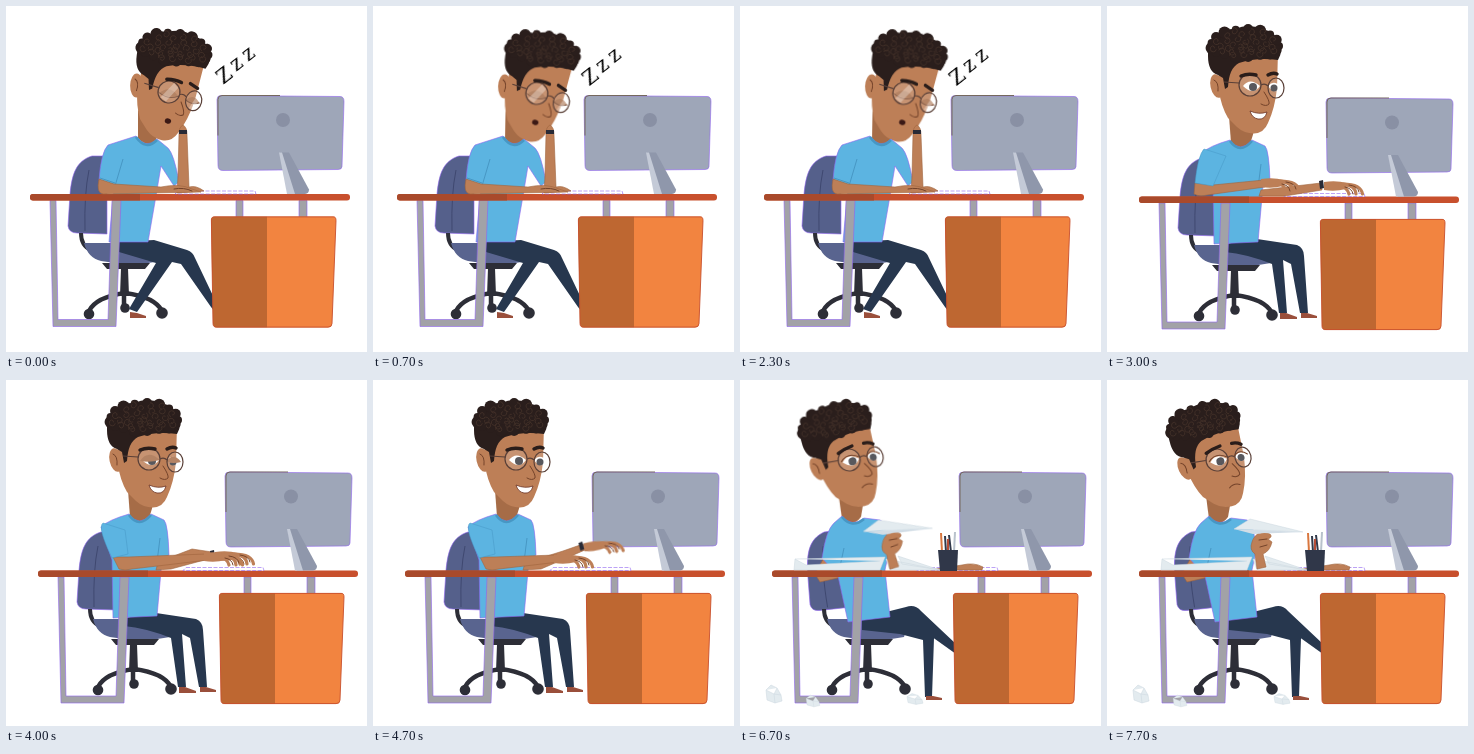
Recreate the animation shown at these times as an HTML page. Size 361x346 px, loop 8 s.

```html
<!DOCTYPE html>
<html lang="en">
<head>
<meta charset="utf-8">
<title>A day at the desk</title>
<style>
  html, body { margin: 0; width: 100%; height: 100%; overflow: hidden; background: #fff; }
  svg { display: block; width: 100%; height: 100%; }

  .skin { fill: #bd7f57; }
  .shade { fill: #a66c47; }
  .shirt { fill: #5cb4e1; }
  .fold { fill: none; stroke: #4797c4; }
  .collar { fill: none; stroke: #4797c4; stroke-width: 2.6; }
  .navy { fill: #27374e; }
  .dark { fill: #2d2e37; }
  .gray { fill: #a2a2a7; }
  .shoe { fill: #9a4f3b; }
  .white { fill: #fff; }
  .paper { fill: #e3ebef; stroke: #cbd6de; stroke-width: .5; }
  .edge { stroke: #8f63f0; stroke-width: .6; }
  .line { fill: none; stroke: #74432a; stroke-width: 1; stroke-linecap: round; }
  .brow { fill: none; stroke: #2a1d1a; stroke-width: 3.4; stroke-linecap: round; }
  .arm { stroke: #a0653f; stroke-width: .6; stroke-linejoin: round; }
  .finger { fill: none; stroke: #bd7f57; stroke-width: 3.2; stroke-linecap: round; }

  /* every part shares one clock */
  .a { animation: 8s linear infinite; }
  .eased { animation-timing-function: ease-in-out; }

  .sleep { animation-name: sleep; animation-timing-function: step-end; }
  .type { animation-name: type; animation-timing-function: step-end; visibility: hidden; }
  .throw { animation-name: throw; animation-timing-function: step-end; visibility: hidden; }
  @keyframes sleep { 0% { visibility: visible } 36.25%, 100% { visibility: hidden } }
  @keyframes type { 0% { visibility: hidden } 36.25% { visibility: visible } 77.5%, 100% { visibility: hidden } }
  @keyframes throw { 0% { visibility: hidden } 77.5%, 100% { visibility: visible } }

  .nod { animation-name: nod; transform-origin: 140px 135px; }
  @keyframes nod {
    0%, 18.75%, 36.25%, 100% { transform: none }
    9.4%, 28% { transform: translateY(1px) rotate(1deg) }
  }
  .z { animation-name: drift; }
  @keyframes drift {
    0%, 18.75%, 36.25%, 100% { transform: none }
    9.4%, 28% { transform: translate(-1px, 1.5px) }
  }

  .lids { animation-name: lids; animation-timing-function: step-end; opacity: 0; }
  @keyframes lids {
    0% { opacity: 0 } 48.75% { opacity: 1 } 52.5% { opacity: 0 }
    65% { opacity: 1 } 67.5%, 100% { opacity: 0 }
  }

  .sleeve { animation-name: sleeve; }
  @keyframes sleeve {
    0%, 46.25%, 75%, 100% { d: path("M97 143 Q91 149 88 177 L106 180 L119 150 Z") }
    50%, 68.75% { d: path("M97 143 Q91 147 106 178 L122 174 L119 150 Z") }
  }
  .near { animation-name: near; }
  @keyframes near {
    0%, 37.5%, 46.25%, 77.5%, 100% { d: path("M88 177 L87 188 Q92 191 100 189 L158 181 L157 174 L106 179 Z") }
    42.5%, 75% { d: path("M88 177 L89 189 Q95 191 102 189 L164 178 L162 171 L106 179 Z") }
    50%, 55.6%, 61.9%, 68.75% { d: path("M107 177 L113 189 Q119 191 126 189 L202 180 L200 174 L122 177 Z") }
    52.5%, 58.75%, 65% { d: path("M107 177 L113 189 Q119 191 126 189 L186 182 L184 175 L122 177 Z") }
  }
  .nearhand { animation-name: nearhand; transform: translate(157px, 177px); }
  @keyframes nearhand {
    0%, 37.5%, 46.25%, 77.5%, 100% { transform: translate(157px, 177px) }
    42.5%, 75% { transform: translate(162px, 174px) rotate(3deg) }
    50%, 55.6%, 61.9%, 68.75% { transform: translate(201px, 177px) }
    52.5%, 58.75%, 65% { transform: translate(184px, 179px) }
  }
  .far { animation-name: far; }
  @keyframes far {
    0%, 37.5%, 46.25%, 77.5%, 100% { d: path("M152 190 L154 184 L214 177 L215 184 L178 190 Z") }
    42.5%, 75% { d: path("M152 190 L154 184 L216 174 L218 181 L178 190 Z") }
    50%, 55.6%, 61.9%, 68.75% { d: path("M150 190 L152 182 L186 169 L206 172 L206 178 L165 189 Z") }
    52.5%, 58.75%, 65% { d: path("M150 190 L152 183 L190 171 L210 164 L212 170 L168 189 Z") }
  }
  .farhand { animation-name: farhand; transform: translate(220px, 180px); }
  @keyframes farhand {
    0%, 37.5%, 46.25%, 77.5%, 100% { transform: translate(220px, 180px) }
    42.5%, 75% { transform: translate(223px, 178px) }
    50%, 55.6%, 61.9%, 68.75% { transform: translate(212px, 176px) }
    52.5%, 58.75%, 65% { transform: translate(214px, 167px) rotate(-7deg) }
  }

  .aim { animation-name: aim; transform-origin: 153px 190px; }
  @keyframes aim {
    0%, 77.5% { transform: rotate(-5deg) }
    81% { transform: rotate(4deg) } 84.5% { transform: rotate(-6deg) }
    88% { transform: rotate(4deg) } 91% { transform: rotate(-3deg) }
    93.75%, 100% { transform: none }
  }
  .sigh { animation-name: sigh; transform-origin: 110px 135px; }
  @keyframes sigh {
    0%, 77.5% { transform: rotate(2deg) } 85% { transform: rotate(-1deg) }
    93.75%, 100% { transform: none }
  }
</style>
</head>
<body>
<svg viewBox="0 0 361 346" preserveAspectRatio="none">
  <defs>
    <g id="back">
      <path class="edge" fill="#55608b" d="M95 152 C79 157 75 170 73 190 L71 222 Q72 229 80 229 L110 230 V152 Z"/>
      <path fill="none" stroke="#3f4870" d="M92 166 Q87 190 88 227"/>
    </g>
    <g id="base">
      <path fill="none" stroke="#2d2e37" stroke-width="4" d="M84 229 Q84 242 94 246"/>
      <path fill="#59648f" d="M87 239 H160 Q168 248 164 257 Q136 263 104 257 Q91 254 87 239 Z"/>
      <path class="dark" d="M105 259 H153 L148 265 H110 Z M124 264 H131 L132 292 H123 Z"/>
      <path fill="none" stroke="#2d2e37" stroke-width="4.5" d="M92 307 Q99 293 128 289 Q158 293 165 307 M127 290 V302"/>
      <circle class="dark" cx="92" cy="310" r="5.3"/>
      <circle class="dark" cx="128" cy="304" r="4.8"/>
      <circle class="dark" cx="165" cy="309" r="5.8"/>
    </g>
    <g id="desk">
      <path class="gray edge" d="M238 197 H245 V214 H238 Z M301 197 H309 V214 H301 Z"/>
      <path fill="#be6731" d="M217 213 H269 V324 H219 Q215 324 215 320 L213 217 Q213 213 217 213 Z"/>
      <path fill="#f28440" d="M269 213 H335 Q338 213 338 217 L334 320 Q334 324 330 324 H269 Z"/>
      <path fill="none" stroke="#c8502d" stroke-width=".9" d="M217 213.4 H335 Q338 213 338 217 L334 320 Q334 323.6 330 323.6 H219 Q215 324 215 320 L213.4 217 Q213 213 217 213.4 Z"/>
      <path class="gray edge" d="M52 197 H58 L60 316 H110 L114 197 H123 L118 323 H55 Z"/>
      <rect x="32" y="190.5" width="320" height="6.5" rx="3" fill="#c8502d"/>
      <path fill="#a94a2b" d="M35 190.5 H142 V197 H35 Q32 197 32 193.7 Q32 190.5 35 190.5 Z"/>
      <path class="white edge" stroke-dasharray="4 1.5" d="M180 187.5 H257 L258 190.5 H177 Z"/>
      <path class="edge" fill="#9ea6b8" d="M223 92 L342 93 Q346 93 346 98 L344 163 Q344 166 340 166 L225 167 Q220 167 220 162 L219 96 Q219 92 223 92 Z"/>
      <path fill="none" stroke="#75685d" d="M220 132 V96 Q220 92 224 92 H282"/>
      <circle cx="285" cy="116.5" r="7" fill="#8990a4"/>
      <path fill="#8f97ab" d="M282 149 H291 L311 186 Q311 190 307 190.5 H291 Z"/>
      <path fill="#c4cad7" d="M281 149 H284 L297 190.5 H289 Z"/>
    </g>
    <g id="skull">
      <ellipse class="skin" cx="110" cy="80" rx="6.5" ry="12" transform="rotate(-12 110 80)"/>
      <path class="line" d="M107 74 Q112 76 111 85"/>
      <path class="skin" d="M111 50 L112 85 Q114 100 121 112 L130 121 Q137 127.5 147 127.5 Q157 127 161 117 Q168 102 170 82 L171 45 Z"/>
      <path class="line" d="M157 86 Q163 95 162 98 Q159 101 154 98"/>
    </g>
    <g id="hair">
      <path fill="#2a1e1c" d="M118 83 L116 72 L111 69 Q101 66 101 50 Q100 36 109 32 Q113 22 128 23 Q142 17 154 23 Q168 25 171 35 Q177 44 171 54 Q150 51 132 57 Q122 62 121 81 Z"/>
      <g id="curls" fill="#2a1e1c"></g>
    </g>
    <g id="specs" fill="none" stroke="#5a4038" stroke-width="1.2">
      <circle cx="143" cy="79" r="11" fill="#fff" fill-opacity=".16"/>
      <ellipse cx="169" cy="82" rx="8" ry="10" fill="#fff" fill-opacity=".16"/>
      <path d="M117 76 L132 77 M154 79 Q158 77 161 80"/>
    </g>
    <g id="eyes">
      <path class="white" d="M136 80 Q143 71 153 80 Q146 90 136 80 Z M161 80 Q167 73 174 81 Q168 90 161 80 Z"/>
      <circle cx="146" cy="81" r="4" fill="#39393f"/>
      <circle cx="167" cy="82" r="3.5" fill="#39393f"/>
    </g>
    <path id="halflids" class="shade" d="M134 81 Q142 69 154 80 Q144 83 134 81 Z M160 82 Q167 71 175 82 Q168 84 160 82 Z"/>
    <g id="hand">
      <path class="skin" d="M-3 -4 Q9 -6 20 -3 L19 3 Q8 6 -3 4 Z"/>
      <path class="finger" d="M13 0 Q20 1 22 8 M15 -1 Q28 -2 29 8 M16 -2 Q34 -2 35.5 8"/>
      <path class="line" stroke-width=".6" d="M18 1 Q25 2 26 8 M22 -1 Q31 0 32 6"/>
    </g>
    <path id="ball" class="paper" d="M-8 -4 L-3 -9 L3 -6 L7 1 L8 7 L1 9 L-7 6 Z M-8 -4 L0 0 L3 -6 M0 0 L1 9 M0 0 L7 1"/>
  </defs>

  <g class="a sleep">
    <g transform="translate(-9 -2)"><use href="#back"/><use href="#base"/></g>
    <path class="navy" d="M112 236 L148 234 L181 244 Q187 246 189 252 L209 294 V306 L205 301 L175 258 L166 256 L131 306 L123 303 L150 257 L113 246 Z"/>
    <path class="shoe" d="M124 306 L131 307 L140 310 V312 H124 Z"/>
    <g class="a eased nod">
      <path class="shade" d="M132 104 L132 132 Q142 143 150 134 L154 120 Z"/>
      <g transform="translate(20 7) rotate(13 143 79)">
        <use href="#skull"/>
        <use href="#hair" transform="translate(3 -3) rotate(-5 138 60)"/>
        <path class="shade" d="M134 82 Q142 71 153 81 Q144 85 134 82 Z M161 83 Q168 74 175 83 Q168 86 161 83 Z"/>
        <path class="line" d="M134 82 Q144 87 153 81 M161 83 Q168 87 175 83"/>
        <use href="#specs"/>
        <path fill="#fff" opacity=".3" d="M136 86 L146 69 L151 73 L142 89 Z M166 90 L172 74 L175 78 L170 91 Z"/>
        <path class="brow" d="M138 67 Q146 65 153 67 M162 66 L170 69"/>
        <ellipse cx="148.5" cy="107.5" rx="3.2" ry="2.7" fill="#3b1915"/>
      </g>
    </g>
    <path class="shirt edge" d="M130 130 Q140 144 151 133 L162 142 Q168 148 173 176 L168 180 L155 160 L150 190 L142 236 H103 L108 180 L93 174 Q95 146 102 139 Z"/>
    <path class="collar" d="M130 131 Q140 145 151 134"/>
    <path class="fold" d="M109 180 L117 153 M94 172 L109 177"/>
    <use href="#desk" transform="translate(-8 -2.5)"/>
    <path class="skin arm" d="M173 128 Q173 121 177 119 Q181 121 181 129 L183 181 Q190 179 198 185 L171 187 L172 170 Z"/>
    <path fill="#282a36" d="M173 124 H181 V128 H173 Z"/>
    <path class="skin arm" d="M93 173 L108 178 L155 181 Q173 177 186 183 L195 186 L97 188 Q90 187 93 173 Z"/>
    <path class="line" d="M168 183 Q178 181 186 185"/>
    <g font-family="'DejaVu Serif', serif" fill="#000">
      <g class="a eased z"><text font-size="20" transform="translate(217 79) rotate(-38)">Z</text></g>
      <g class="a eased z"><text font-size="20" transform="translate(230 66) rotate(-38)">z</text></g>
      <g class="a eased z"><text font-size="20" transform="translate(242 56) rotate(-38)">z</text></g>
    </g>
  </g>

  <g class="a type">
    <use href="#back"/><use href="#base"/>
    <path class="navy" d="M118 238 L150 233 L190 239 Q197 242 197 250 L201 307 H193 L184 258 L176 254 L180 307 H172 L165 258 Q140 248 118 246 Z"/>
    <path class="shoe" d="M173 307 H179 L190 311 V313 H173 Z M194 307 H200 L210 310 V312 H194 Z"/>
    <path class="shade" d="M122 110 L124 137 Q134 147 144 135 L148 122 Z"/>
    <use href="#skull"/><use href="#hair"/><use href="#eyes"/>
    <use class="a lids" href="#halflids"/>
    <use href="#specs"/>
    <path class="brow" d="M134 70 Q141 67 149 69 M161 69 Q166 66 170 68"/>
    <path class="white" stroke="#6b3324" stroke-width=".8" d="M143 105 Q152 109 160 106 Q158 114 151 113 Q145 112 143 105 Z"/>
    <path class="shirt edge" d="M123 134 Q133 148 145 134 L158 140 Q162 144 163 175 L156 180 L151 236 L107 238 L106 180 L95 147 Q102 140 123 134 Z"/>
    <path class="collar" d="M123 135 Q133 149 145 135"/>
    <path class="fold" d="M151 182 L154 158"/>
    <use href="#desk"/>
    <path class="a eased far skin arm" d="M152 190 L154 184 L214 177 L215 184 L178 190 Z"/>
    <g class="a eased farhand">
      <use href="#hand"/>
      <path fill="#282a36" d="M-8 -5 L-4 -6 L-3 2 L-7 3 Z"/>
    </g>
    <path class="a eased near skin arm" d="M88 177 L87 188 Q92 191 100 189 L158 181 L157 174 L106 179 Z"/>
    <g class="a eased nearhand"><use href="#hand"/></g>
    <path class="a eased sleeve shirt" stroke="#4797c4" stroke-width=".5" d="M97 143 Q91 149 88 177 L106 180 L119 150 Z"/>
  </g>

  <g class="a throw">
    <use href="#back" transform="rotate(-8 90 230)"/><use href="#base"/>
    <path class="navy" d="M122 238 L166 227 Q175 224 181 231 L216 264 V274 L174 244 L186 247 Q194 249 194 258 L192 317 H185 L183 260 L160 254 L122 250 Z"/>
    <path class="shoe" d="M186 316 H193 L202 318 V320 H186 Z"/>
    <path class="skin arm" d="M86 174 L75 194 L80 202 L102 197 L106 180 Z"/>
    <g class="a eased sigh">
      <path class="shade" d="M98 108 L102 139 Q113 148 121 137 L124 120 Z"/>
      <g transform="translate(-33 1) rotate(-13 143 79)">
        <use href="#skull"/><use href="#hair"/><use href="#eyes"/><use href="#specs"/>
        <path class="line" d="M135 79 Q143 71 153 78 M161 79 Q167 73 174 80"/>
        <path class="brow" d="M134 70 Q141 67 149 66 M161 66 Q166 66 170 69"/>
        <path class="line" d="M149 109 Q154 105 160 108"/>
      </g>
    </g>
    <path class="shirt edge" d="M102 136 Q112 148 124 138 L140 140 Q149 144 148 176 L145 190 L150 237 L108 242 L98 196 L82 178 Q86 150 94 143 Z"/>
    <path class="collar" d="M102 137 Q112 149 124 139"/>
    <path class="fold" d="M98 196 L104 168"/>
    <use href="#desk"/>
    <path class="skin arm" d="M190 190 L222 185 Q234 182 243 187 L242 190 Z"/>
    <path class="paper" d="M55 179 L145 177 L140 190 H54 Z M55 179 L66 185 L140 181"/>
    <path class="paper" d="M146 179 L200 190 H150 Z M158 176 L200 190 L162 184 Z"/>
    <g fill="none" stroke-width="2">
      <path stroke="#d9773f" d="M202 172 L201 153"/>
      <path stroke="#31394a" d="M206 172 L205 156 M211 172 L209 155"/>
      <path stroke="#b64d37" d="M208 172 L208 159"/>
      <path stroke="#b9c2cc" d="M214 172 L215 152"/>
    </g>
    <path fill="#303749" d="M198 170 H218 L217 191 H200 Z"/>
    <g class="a eased aim">
      <path class="skin arm" d="M150 189 L148 174 Q142 170 145 162 Q147 155 154 152 L163 154 Q166 157 161 159 L165 162 Q163 171 156 174 L159 187 Z"/>
      <path class="paper" d="M127 149 L143 139 L196 152 Z"/>
      <path fill="#d2dde6" d="M127 149 L196 152 L146 154 Z"/>
      <path class="finger" d="M148 160 Q153 153 161 155"/>
      <path class="line" d="M152 160 L160 159 M153 167 L160 165"/>
    </g>
    <use href="#ball" x="34" y="314"/>
    <use href="#ball" transform="translate(73 321) scale(.85 .65)"/>
    <use href="#ball" transform="translate(175 319) scale(1 .6)"/>
  </g>
</svg>
<script>
  const curls = document.getElementById('curls');
  const add = (tag, attrs) => {
    const el = document.createElementNS('http://www.w3.org/2000/svg', tag);
    for (const k in attrs) el.setAttribute(k, attrs[k]);
    curls.append(el);
  };
  // Point on the hair mass, flatter along the hairline
  const at = (angle, r) => [
    138 + 34 * r * Math.cos(angle),
    40 + (Math.sin(angle) < 0 ? 17 : 11) * r * Math.sin(angle)
  ];
  for (let i = 0; i < 17; i++) {
    const [cx, cy] = at(i * Math.PI / 8.5, 1);
    add('circle', { cx, cy, r: 4 + i * 7 % 3 });
  }
  for (let i = 0; i < 32; i++) {
    const [x, y] = at(i * 2.4, Math.sqrt(i / 32));
    add('path', {
      d: 'M-3 1 A3 3 0 1 1 2 2 Q0 3 -1 1',
      transform: `translate(${x} ${y}) rotate(${i * 67})`,
      fill: 'none', stroke: '#433129', 'stroke-width': .8
    });
  }
</script>
</body>
</html>
```
